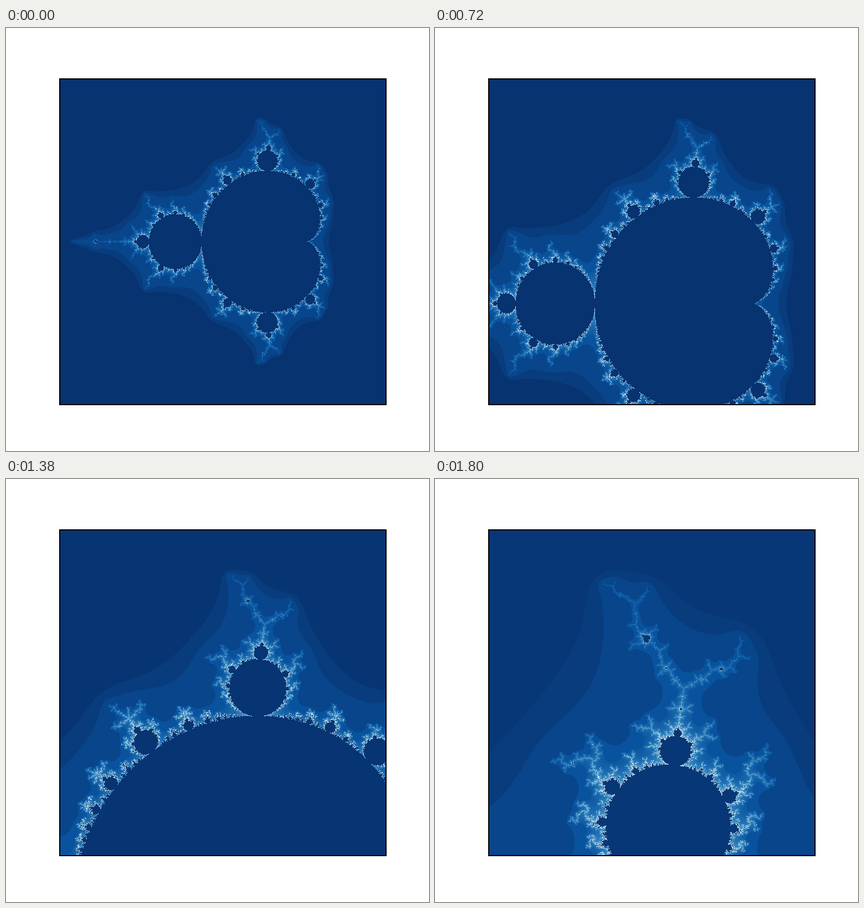
These frames come from a looping animation (748 px wide and 748 px high, 1.86 s). An HTML page with a canvas:

```html
<!DOCTYPE html>
<html>
<head>
<meta charset="utf-8">
<style>
html, body { margin: 0; width: 100%; height: 100%; overflow: hidden; background: #fff; }
canvas { display: block; }
</style>
</head>
<body>
<canvas id="stage" width="748" height="748"></canvas>
<script>
const ctx = document.getElementById('stage').getContext('2d');
const FRAMES = 31, STEP = 60, LIMIT = 100, RADIUS = 5;
const BOX = { x: 95.37, y: 89.76, size: 575.96 };
const LEFT = 95, TOP = 90, SIDE = 577;

const blues = [[8, 48, 107], [8, 81, 156], [33, 113, 181], [66, 146, 198],
  [107, 174, 214], [158, 202, 225], [198, 219, 239], [222, 235, 247], [247, 251, 255]];
const mix = (a, b, f) => a + (b - a) * f;

function shade(v) {
  const p = Math.min(v, 0.9999) * 8, i = Math.floor(p);
  return blues[i].map((c, j) => mix(c, blues[i + 1][j], p - i));
}

// The lowest escape counts share a few flat tones.
function palette(f) {
  return Array.from({ length: LIMIT }, (_, n) => {
    if (n < 6) return [7, mix(51, 55, f ** 3), mix(112, 118, f ** 3)];
    if (n === 6) return [8, 60, 125];
    if (n < 12) return [8, 69, 138];
    if (n < 16) return shade(0.13);
    return shade(n / (LIMIT - 1));
  });
}

function escapeCount(cx, cy) {
  const y2 = cy * cy, a = cx - 0.25, q = a * a + y2;
  // Main cardioid and the disc to its left never escape.
  if (q * (q + a) < y2 / 4 || (cx + 1) ** 2 + y2 < 0.0625) return 0;
  let x = cx, y = cy;
  for (let n = 0; n < LIMIT; n++) {
    const xx = x * x, yy = y * y;
    if (xx + yy > RADIUS * RADIUS) return n;
    y = 2 * x * y + cy;
    x = xx - yy + cx;
  }
  return 0;
}

function render(k) {
  const f = k / (FRAMES - 1), colors = palette(f);
  const x0 = mix(-2.1, -0.4, f), x1 = mix(1, 0.1, f);
  const y0 = mix(1.5, 1.2, f), y1 = mix(-1.5, 0.7, f);
  const img = ctx.createImageData(SIDE, SIDE);
  let p = 0;
  for (let j = 0; j < SIDE; j++) {
    const cy = mix(y0, y1, (TOP + j + 0.5 - BOX.y) / BOX.size);
    for (let i = 0; i < SIDE; i++) {
      const cx = mix(x0, x1, (LEFT + i + 0.5 - BOX.x) / BOX.size);
      const c = colors[escapeCount(cx, cy)];
      // One frame step after the first escapes, n is one higher than |z| > 2 gives.
      img.data[p++] = c[0];
      img.data[p++] = c[1];
      img.data[p++] = c[2];
      img.data[p++] = 255;
    }
  }
  return img;
}

const cache = [];
let shown = -1;

function draw(now) {
  const k = Math.floor(now / STEP) % FRAMES;
  if (k !== shown) {
    shown = k;
    cache[k] = cache[k] || render(k);
    ctx.fillStyle = '#fff';
    ctx.fillRect(0, 0, 748, 748);
    ctx.putImageData(cache[k], LEFT, TOP);
    ctx.lineWidth = 2;
    ctx.strokeStyle = '#000';
    ctx.strokeRect(95, 90, 577, 576);
  }
  requestAnimationFrame(() => draw(performance.now()));
}
draw(performance.now());
</script>
</body>
</html>
```
